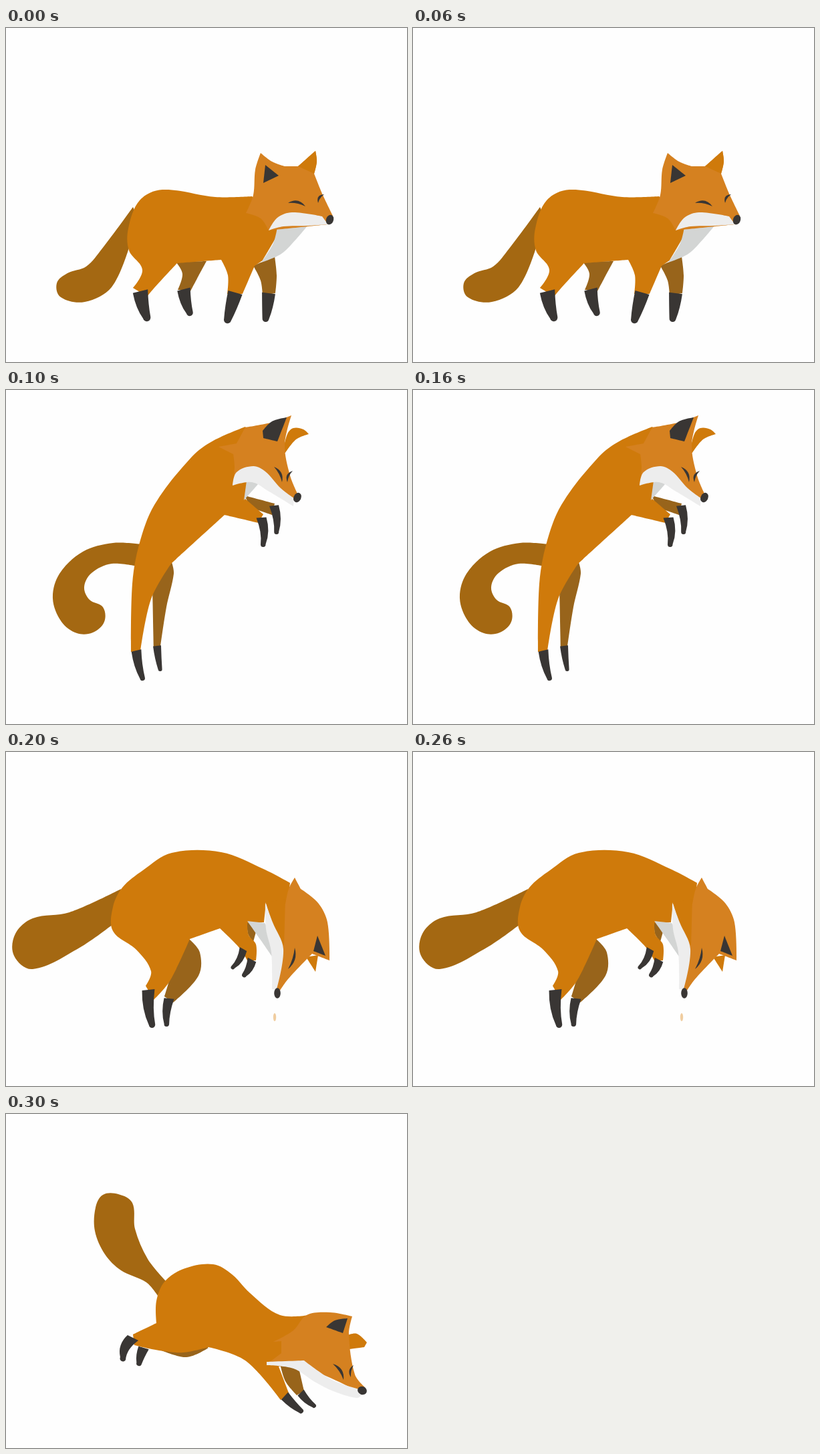
Animation, 600 px wide and 500 px high, one loop 0.4 s. Source, as an HTML page:

```html
<!DOCTYPE html>
<html lang="en">
<head>
<meta charset="utf-8">
<title>Leaping fox</title>
<style>
  html, body { margin: 0; width: 100%; height: 100%; overflow: hidden; background: #fefefe; }
  svg { display: block; width: 100%; height: 100%; }
  .pose { visibility: hidden; animation: show 400ms step-end infinite; filter: blur(.5px); }
  .leap { animation-delay: -300ms; }
  .dive { animation-delay: -200ms; }
  .land { animation-delay: -100ms; }
  @keyframes show {
    0% { visibility: visible; }
    25%, 100% { visibility: hidden; }
  }
  .coat { fill: #cf7a0b; }
  .face { fill: #d58120; }
  .tail { fill: #a46812; }
  .far { fill: #98641b; }
  .dark { fill: #393634; }
  .white { fill: #ededed; }
  .chest { fill: #d3d5d4; }
  .drop { fill: #f0cda0; }
</style>
</head>
<body>
<svg id="stage" viewBox="0 0 600 500"></svg>
<script>
const stage = document.getElementById('stage');
let group;

function add(parent, tag, attrs) {
  const el = document.createElementNS('http://www.w3.org/2000/svg', tag);
  for (const name in attrs) el.setAttribute(name, attrs[name]);
  return parent.appendChild(el);
}

function pose(name, draw) {
  group = add(stage, 'g', { class: 'pose ' + name });
  draw();
}

// Smooth closed outline through the points; * marks a sharp corner.
function shape(color, text) {
  const pts = text.split(' ').map(word => {
    const [x, y] = word.split(',').map(parseFloat);
    return { x, y, corner: word.endsWith('*') };
  });
  const at = i => pts[(i + pts.length) % pts.length];
  const handle = (i, reach) => {
    const p = at(i), a = at(i - 1), b = at(i + 1);
    if (p.corner) return [p.x, p.y];
    const k = reach / Math.hypot(b.x - a.x, b.y - a.y);
    return [p.x + (b.x - a.x) * k, p.y + (b.y - a.y) * k];
  };
  let d = `M${at(0).x} ${at(0).y}`;
  pts.forEach((p, i) => {
    const q = at(i + 1), reach = Math.hypot(q.x - p.x, q.y - p.y) / 3;
    d += `C${handle(i, reach)} ${handle(i + 1, -reach)} ${q.x},${q.y}`;
  });
  add(group, 'path', { class: color, d: d + 'Z' });
}

// Point at a share of the way from one end to the other, pushed sideways.
function along(x, y, tx, ty) {
  const len = Math.hypot(tx - x, ty - y), ux = (tx - x) / len, uy = (ty - y) / len;
  return (share, side) => [x + ux * len * share - uy * side, y + uy * len * share + ux * side];
}

function sock(x, y, tx, ty, width, bend) {
  const r = width / 4, at = along(x, y, tx, ty);
  const end = 1 - r / Math.hypot(tx - x, ty - y);
  add(group, 'path', { class: 'dark', d:
    `M${at(0, width / 2)}Q${at(.5, width * .42 + bend)} ${at(end, r)}` +
    `A${r} ${r} 0 0 0 ${at(end, -r)}Q${at(.5, bend - width * .42)} ${at(0, -width / 2)}Z` });
}

function eye(x, y, tx, ty, bend) {
  const at = along(x, y, tx, ty);
  add(group, 'path', { class: 'dark', d:
    `M${x} ${y}Q${at(.5, bend)} ${tx} ${ty}Q${at(.5, bend * .3)} ${x} ${y}Z` });
}

function oval(color, cx, cy, rx, ry, turn) {
  add(group, 'ellipse', { class: color, cx, cy, rx, ry, transform: `rotate(${turn} ${cx} ${cy})` });
}

pose('stand', () => {
  shape('tail', '190,268* 144,330 120,357 92,367 76,382 82,403 118,410 158,388 184,329* 200,290*');
  shape('far', '254,350* 300,349* 286,375 276,394* 257,392* 264,368');
  shape('far', '370,356* 402,342* 405,370 403,397* 384,400* 381,378');
  shape('coat', '183,300 200,258 234,242 313,253 368,252* 412,300* 384,348* 372,356* 354,398* 331,398* 332,370 322,347* 256,352* 221,390 211,402* 190,389* 204,362 184,333');
  sock(201, 394, 212, 439, 23, 3);
  sock(266, 391, 276, 431, 20, 3);
  sock(343, 396, 330, 442, 22, 0);
  sock(393, 397, 388, 440, 20, -1);
  shape('chest', '406,298* 452,295* 436,314 412,338 382,351* 400,322');
  shape('face', '381,187* 398,200 417,207* 437,207* 463,184* 465,200 461,218* 474,250 489,281* 482,294* 393,303* 381,285 359,277* 370,250 373,212');
  shape('coat', '437,207* 463,184* 465,200 461,218*');
  shape('white', '393,303* 406,284 428,276 473,282* 482,294* 450,296 415,297');
  shape('dark', '388,205* 408,221* 385,232*');
  eye(422, 262, 448, 267, -12);
  eye(467, 262, 476, 249, -10);
  oval('dark', 484.5, 287, 5.5, 7.5, 20);
});

pose('leap', () => {
  shape('tail', '203,231* 160,229 115,242 80,275 70,312 83,347 106,364 130,363 147,347 145,325 125,314 117,295 128,274 158,260 197,264*');
  shape('far', '219,292* 248,258* 251,275 240,325 231,384* 221,384*');
  shape('far', '357,158* 402,170* 398,187* 366,176*');
  shape('coat', '358,55* 310,76 278,100 222,172 199,232 189,290 187,392* 201,391* 217,313 247,260* 327,187* 378,199* 385,186* 358,163* 362,138* 400,100*');
  sock(195, 390, 205, 435, 15, 3);
  sock(226, 383, 231, 421, 12, 1);
  sock(401, 173, 405, 216, 14, -5);
  sock(382, 191, 385, 235, 15, -6);
  shape('chest', '360,136* 378,140* 356,165*');
  shape('coat', '414,94* 421,66 430,57 445,59 453,66* 434,74 418,94*');
  shape('face', '358,56* 400,48 427,38* 417,82 425,128 437,157* 430,165* 388,130* 364,118 340,140* 342,115 340,96* 318,85* 345,80*');
  shape('white', '339,143* 345,123 370,114 388,122 411,147 431,162* 430,174* 392,151 368,138');
  shape('dark', '420,41* 398,47 384,61* 385,72* 406,77*');
  eye(401, 115, 413, 138, -11);
  eye(421, 138, 429, 121, -10);
  oval('dark', 436, 161, 5.5, 7.5, 25);
});

pose('dive', () => {
  shape('tail', '172,205* 95,240 40,249 14,272 12,305 40,325 110,293 160,258*');
  shape('far', '274,280* 290,300 288,335 250,375* 237,366* 246,335 250,310*');
  shape('far', '361,254* 362,272 370,284* 376,262*');
  shape('coat', '174,203 205,177 248,151 322,150 385,175 425,196* 420,240* 389,227* 386,255* 361,256* 363,274 374,288 374,312* 361,312* 350,294 320,264* 275,280* 245,343 221,371* 209,350* 217,328 195,296 160,268 160,232');
  sock(244, 369, 240, 411, 15, 4);
  sock(213, 356, 219, 413, 19, 5);
  sock(368, 311, 355, 337, 14, -4);
  sock(355, 295, 338, 325, 12, -6);
  shape('chest', '361,253* 387,256* 400,280 398,306* 380,280');
  shape('coat', '449,307* 463,329* 467,304*');
  shape('face', '432,188* 441,205* 467,226 481,255 484,312* 458,302* 422,340 410,357* 403,354* 400,260* 389,227* 418,228* 423,205');
  shape('coat', '389,225* 418,220* 416,290* 396,250*');
  shape('white', '388,225* 389,265 397,300 398,355* 405,355* 415,295 399,255');
  shape('dark', '466,275* 478,305* 460,298*');
  eye(432, 293, 422, 325, -11);
  oval('dark', 406, 361, 4.8, 7.8, 0);
  oval('drop', 402, 397, 2.2, 6, 0);
});

pose('land', () => {
  shape('tail', '239,250* 212,217 193,172 189,133 168,120 145,121 134,140 133,175 148,210 172,234 210,252 227,272*');
  shape('far', '228,352* 270,364 303,350* 290,342*');
  shape('far', '410,374* 438,380* 446,415* 435,421* 418,400');
  shape('coat', '238,250 268,231 310,225 338,240 365,268 410,301 460,300* 440,375* 408,378* 424,420* 411,428* 358,369 303,349* 265,357 229,354 192,346* 190,330* 225,313* 225,280');
  sock(190, 335, 173, 370, 18, 9);
  sock(206, 350, 198, 377, 16, 2);
  sock(441, 417, 463, 439, 13, 3);
  sock(417, 422, 444, 447, 15, 2);
  shape('coat', '511,331* 525,329 540,342* 536,349* 514,352*');
  shape('face', '450,301 485,297 518,303* 513,330 522,390 537,409* 528,416* 460,385 391,374* 412,358* 412,340* 400,341* 430,324');
  shape('white', '390,371* 446,369* 488,398 528,412* 532,420 524,425 490,415 462,401 430,381 390,376*');
  shape('dark', '511,306* 504,328* 479,319* 492,309');
  eye(489, 374, 505, 398, -12);
  eye(516, 394, 520, 376, -9);
  oval('dark', 533, 414, 7, 6, 20);
});
</script>
</body>
</html>
```
